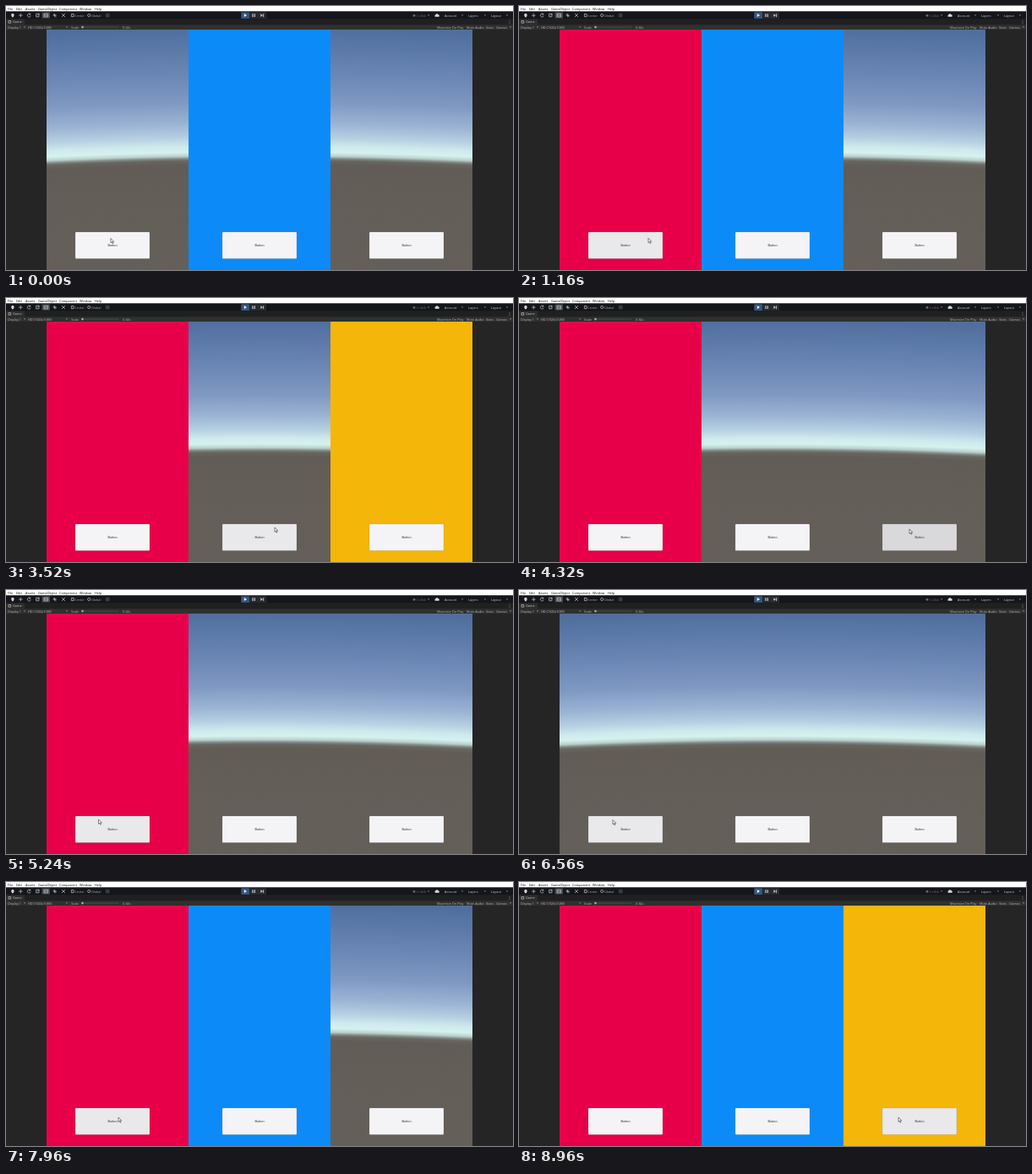
An HTML page for the animation above (9 s loop, 600 px wide and 313 px high).

```html
<!DOCTYPE html>
<html lang="en">
<head>
<meta charset="utf-8">
<title>Panel toggles</title>
<style>
  html, body { margin: 0; width: 100%; height: 100%; overflow: hidden; background: #252525; }
  svg { display: block; width: 100vw; height: 100vh; }
  text { font-family: "Open Sans", "Noto Sans", sans-serif; font-size: 3.8px; }
  .button text { font-family: "Liberation Sans", Arial, sans-serif; font-size: 3.9px; fill: #323232; text-anchor: middle; }
  .icon { fill: none; stroke: #c4c4c4; stroke-width: .7; }
</style>
</head>
<body>
<svg id="stage" viewBox="0 0 600 313" preserveAspectRatio="none">
  <defs>
    <radialGradient id="sky" gradientUnits="userSpaceOnUse"></radialGradient>
  </defs>
  <rect width="600" height="313" fill="#252525"/>
  <rect width="600" height="6.5" fill="#fdfdfd"/>
  <rect y="6.5" width="600" height="9" fill="#14161b"/>
  <rect y="15.5" width="600" height="7" fill="#202021"/>
  <rect y="15.5" width="22" height="7" fill="#2d2d2d"/>
  <rect y="22.3" width="600" height="5.7" fill="#303030"/>
  <g id="labels"></g>

  <!-- tool icons -->
  <rect x="42.5" y="7.5" width="9.5" height="7" fill="#444950"/>
  <path d="M6 10.5l1-1.5 2 0 .7 2-1 2.3H7z" fill="#d0d0d0"/>
  <g class="icon">
    <path d="M17.3 8.8v4.6M15 11.1h4.6M28.6 9.6a2 2 0 1 0 .6 2M28.8 8.6v1.6h-1.6"/>
    <path d="M35.6 9.2h3.4v3.6h-3.4zM37 11.4l2.6-2.6M45 9.2h4.6v3.8H45zM45 11.1h4.6"/>
    <path d="M55.5 11.1h4.4M57.7 9v4.2M56 9.5l3.4 3.3M66 9l4 4M70 9l-4 4"/>
    <path d="M77.4 9.4h2.6v3.2h-2.6z"/>
    <circle cx="98.2" cy="11" r="1.6"/>
    <path d="M118.4 9.3h3.6v3.6h-3.6zM120.2 9.3v3.6M118.4 11.1h3.6" stroke="#50535a"/>
  </g>
  <rect x="278.3" y="7.3" width="9.6" height="7.6" fill="#36587f"/>
  <rect x="288.2" y="7.3" width="19.8" height="7.6" fill="#292b30"/>
  <path d="M281.8 9.1l3.3 2-3.3 2z" fill="#e3edf7"/>
  <path d="M291.4 9.3h1.1v3.6h-1.1zM293.7 9.3h1.1v3.6h-1.1zM301.4 9.2l2.4 1.9-2.4 1.9zM304.2 9.2h.9v3.8h-.9z" fill="#d4d4d4"/>
  <circle cx="483" cy="11.2" r="1.5" fill="#666"/>
  <path d="M508 12.8a1.2 1.2 0 0 1 .2-2.2 1.8 1.8 0 0 1 3.4-.3 1.3 1.3 0 0 1 .4 2.5z" fill="#d8d8d8"/>
  <path d="M3 17.5h2.7v2.7H3z" class="icon"/>
  <path d="M89 25.1h44" stroke="#5b5b5b" stroke-width=".6"/>
  <circle cx="90.5" cy="25.1" r="1.3" fill="#aaa"/>
  <path d="M596 17.3v.7M596 18.9v.7M596 20.5v.7" stroke="#bbb" stroke-width=".7"/>
  <g id="arrows" fill="#b5b5b5"></g>

  <rect x="48" y="28" width="504" height="285" fill="url(#sky)"/>
  <g id="panels"></g>
  <g id="buttons"></g>
  <path id="cursor" d="M0 0v5.3l1.25-1.1.9 2 .85-.4-.9-1.9h1.65z" fill="#fff" stroke="#222" stroke-width=".55"/>
</svg>
<script>
const LOOP = 9000;
const NS = "http://www.w3.org/2000/svg";
const byId = id => document.getElementById(id);
const clamp = v => Math.max(0, Math.min(1, v));

function add(parent, tag, attrs, content = "") {
  const node = document.createElementNS(NS, tag);
  for (const key in attrs) node.setAttribute(key, attrs[key]);
  node.textContent = content;
  parent.append(node);
  return node;
}

// The horizon is a wide arc, so the sky is a slice of a huge radial gradient.
const centreY = 5472, skyTop = 18, skyBottom = 318;
const sky = byId("sky");
const skyAttrs = { cx: 300, cy: centreY, r: centreY - skyTop, fr: centreY - skyBottom };
for (const key in skyAttrs) sky.setAttribute(key, skyAttrs[key]);
[[313, "#655f59"], [230, "#645e58"], [188, "#625c57"], [183, "#68655f"], [180.5, "#808783"],
 [177.5, "#b9d0cc"], [173, "#d5f2ee"], [166, "#cfe9ec"], [156, "#b7d0e2"], [140, "#9cb5d4"],
 [115, "#8099c3"], [80, "#6a86b4"], [28, "#506f9f"]].forEach(([y, color]) =>
  add(sky, "stop", { offset: (skyBottom - y) / (skyBottom - skyTop), "stop-color": color }));

function labels(y, fill, items) {
  for (const [x, text] of items) add(byId("labels"), "text", { x, y, fill }, text);
}
labels(4.5, "#111", [[2, "File"], [12, "Edit"], [23, "Assets"], [38, "GameObject"],
  [63, "Component"], [87, "Window"], [105, "Help"]]);
labels(12.5, "#aaa", [[81, "Center"], [101, "Global"]]);
labels(12.5, "#666", [[486, "Collab"]]);
labels(12.5, "#ccc", [[519, "Account"], [547, "Layers"], [574, "Layout"]]);
labels(20.4, "#ccc", [[8, "Game"]]);
labels(26.5, "#b5b5b5", [[2, "Display 1"], [26, "HD (1920x1080)"], [77, "Scale"], [138, "0.34x"],
  [510, "Maximize On Play"], [545, "Mute Audio"], [568, "Stats"], [580, "Gizmos"]]);
for (const [x, y] of [[22, 25], [72, 25], [597, 25], [500, 11], [540, 11], [567, 11], [593, 11]])
  add(byId("arrows"), "path", { d: `M${x - 1} ${y - .5}h2l-1 1.3z` });

const panels = ["#e70049", "#0c8bf8", "#f4b608"].map((fill, i) =>
  add(byId("panels"), "rect", { x: 48 + 168 * i, y: 28, width: 168, height: 285, fill }));

const buttonCentres = [126, 300, 474];
const buttons = buttonCentres.map(cx => {
  const group = add(byId("buttons"), "g", { class: "button" });
  const face = add(group, "rect", { x: cx - 44, y: 268, width: 88, height: 31.5, rx: 1,
    stroke: "#77777a", "stroke-opacity": .45, "stroke-width": .4 });
  add(group, "text", { x: cx, y: 285.3 }, "Button");
  return face;
});

// [time of press, panel]; the panel toggles on release
const clicks = [[640, 0], [2000, 2], [3200, 1], [4160, 2], [5280, 0], [7080, 1], [7760, 0], [8640, 2]];
const HOLD = 120, FADE = 80;
const startsOn = [false, true, false];

// [time, x, y] of the pointer tip
const path = [[0, 124, 275.5], [1000, 124, 275.5], [1880, 453, 273], [2680, 453, 273],
  [3140, 318, 272], [3620, 318, 272], [4080, 462, 274], [4480, 462, 274], [5160, 109.5, 272],
  [6560, 111, 272.5], [6680, 111, 272.5], [7020, 290, 277], [7320, 290, 277], [7700, 133, 279],
  [8120, 133, 279], [8580, 449, 279], [LOOP, 449, 279]];

function pointerAt(t) {
  const next = path.findIndex(point => point[0] > t);
  const [t0, x0, y0] = path[next - 1], [t1, x1, y1] = path[next];
  const p = (t - t0) / (t1 - t0), eased = p * p * (3 - 2 * p);
  return [x0 + (x1 - x0) * eased, y0 + (y1 - y0) * eased];
}

function pressAmount(t, i) {
  return Math.max(0, ...clicks.filter(click => click[1] === i).map(([start]) =>
    Math.min(clamp((t - start) / FADE), clamp((start + HOLD + FADE - t) / FADE))));
}

function draw(t) {
  const [x, y] = pointerAt(t);
  byId("cursor").setAttribute("transform", `translate(${x} ${y})`);
  panels.forEach((panel, i) => {
    const toggles = clicks.filter(([start, target]) => target === i && t >= start + HOLD).length;
    panel.setAttribute("visibility", startsOn[i] !== (toggles % 2 === 1) ? "visible" : "hidden");
    const hover = t < clicks[0][0] ? 0 : clamp((44 - Math.abs(x - buttonCentres[i])) / 8);
    const shade = 244 - 11 * hover - 33 * pressAmount(t, i);
    buttons[i].setAttribute("fill", `rgb(${shade},${shade - 1},${shade + 1})`);
  });
}

const begin = performance.now();
function tick() {
  draw((performance.now() - begin) % LOOP);
  requestAnimationFrame(tick);
}
tick();
</script>
</body>
</html>
```
